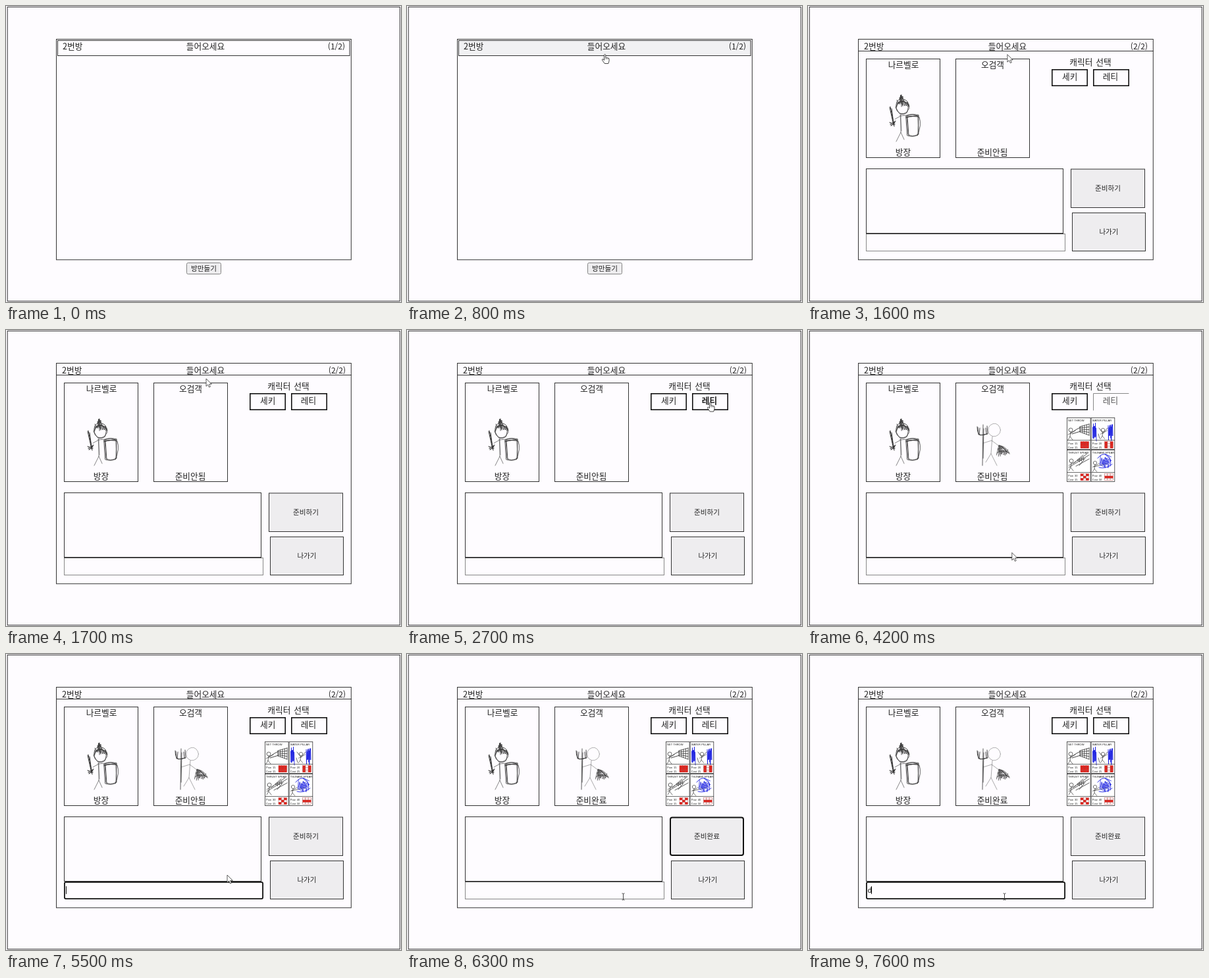
Write an HTML page that moves like this. It is 600 by 450 pixels and loops after 8 s.

```html
<!DOCTYPE html>
<html lang="ko">
<head>
<meta charset="utf-8">
<style>
html, body { margin: 0; width: 100%; height: 100%; overflow: hidden; background: #fefcff; }
svg { display: block; font-family: "Noto Sans CJK KR", "Noto Sans CJK", sans-serif; }
</style>
</head>
<body>
<svg id="stage" width="600" height="450" viewBox="0 0 600 450"></svg>
<script>
const stage = document.getElementById('stage');
const INK = '#222', LINE = '#333', PAPER = '#fefcff', GREY = '#eeedef';

let seed = 7;
const rnd = () => (seed = (seed * 16807) % 2147483647) / 2147483647 - 0.5;

// x, y, r, b are the outer edges; the border lies inside them
const box = (x, y, r, b, stroke = LINE, w = 1, fill = 'none', rx = 0) =>
  `<rect x="${x + w / 2}" y="${y + w / 2}" width="${r - x - w}" height="${b - y - w}" rx="${rx}" fill="${fill}" stroke="${stroke}" stroke-width="${w}"/>`;
// y is the vertical middle of the glyphs
const text = (s, x, y, size = 12.7, anchor = 'middle', extra = '') =>
  `<text x="${x}" y="${y + .4 + size * .37}" font-size="${size}" text-anchor="${anchor}" fill="${INK}" ${extra}>${s}</text>`;
const path = (d, w = .7, c = '#333') =>
  `<path d="${d}" fill="none" stroke="${c}" stroke-width="${w}" stroke-linecap="round" stroke-linejoin="round"/>`;

// Wobbly pen loops around an ellipse
function loops(cx, cy, rx, ry, n, jitter, w, c) {
  const pts = [];
  for (let i = 0; i <= n * 14; i++) {
    const a = i / 14 * Math.PI * 2;
    pts.push((cx + rx * Math.cos(a) + rnd() * jitter).toFixed(1) + ' ' + (cy + ry * Math.sin(a) + rnd() * jitter).toFixed(1));
  }
  return path('M' + pts.join('L'), w, c);
}
// Hatching back and forth across the line between two ends
function hatch(x0, y0, x1, y1, n, width, w, c) {
  const len = Math.hypot(x1 - x0, y1 - y0), nx = (y0 - y1) / len, ny = (x1 - x0) / len, pts = [];
  for (let i = 0; i <= n; i++) {
    const k = i / n, off = width * ((i % 2 ? .5 : -.5) + rnd() * .5);
    pts.push((x0 + (x1 - x0) * k + nx * off).toFixed(1) + ' ' + (y0 + (y1 - y0) * k + ny * off).toFixed(1));
  }
  return path('M' + pts.join('L'), w, c);
}
// Net between a left and a right edge
function net(xl, l0, l1, xr, r0, r1, n) {
  let d = '';
  for (let i = 0; i <= n; i++) {
    const k = i / n, x = xl + (xr - xl) * k;
    d += `M${xl} ${l0 + (l1 - l0) * k}L${xr} ${r0 + (r1 - r0) * k}M${x} ${l0 + (r0 - l0) * k}L${x + rnd()} ${l1 + (r1 - l1) * k}`;
  }
  return path(d, .7, '#222');
}

const knight =
  loops(143.5, 154.5, 9.5, 10, 3, 2.6, .6) +
  path('M134 154Q133 145 139 142L141 135L144 142Q152 142 154 153M136 149Q143 141 153 150M140 144L141 136L144 152M142 135L142 153', .9) +
  hatch(135, 147, 152, 148, 13, 6, .8) + hatch(139, 142, 145, 142, 5, 7, .8) +
  path('M141 165L141 192L134 206M141 192L146 203M132 172L141 167L150 166M140 165L142 190', .6) +
  path('M124 154L130 181M125 153L131 183M127 156L130 178', 1) +
  path('M125 180L133 175M124 177L132 180M126 182L132 177', 1.1) +
  path('M149 167Q158 163 168 166L167 196Q160 200 151 197ZM151 166Q161 163 167 168L168 195Q157 200 152 195L150 168M149 170Q160 166 169 169Q173 181 166 197M151 168L153 197M150 167L168 168M149 169L168 166', .8);

let fan = '';
for (let i = 0; i <= 7; i++) fan += `M${290 + i * .7} ${175 + i * .3}L${286.5 + i * 2.8} ${190 + 3 * Math.sin(i) - i * .5}`;
const fisher =
  loops(283, 152, 9.3, 9.8, 1, .5, .5, '#666') +
  path('M266 144L265 206M267 150L266 195', .8) +
  path('M257 147Q257 158 262 160L273 158L272 146M258 148L259 159Q266 161 272 158M261 149L260 159M270 149L271 158', .9) +
  path('M280 162L278 188L270 201M278 188L287 206M266 172L279 168L291 177', .5, '#555') +
  path(fan + 'M288 181Q295 176 301 182M287 187Q297 180 305 187M290 176Q299 175 306 187', .75) +
  hatch(289, 184, 303, 186, 14, 7, .6);

const BLUE = '#1d22e0', RED = '#e3241c';
const person = (x, y, s = 1) => `<g transform="translate(${x} ${y}) scale(${s})">` +
  path('M-3 0a3 3 0 1 0 6 0a3 3 0 1 0 -6 0M0 3L-1 10L-4 15M-1 10L3 15M-4 7L0 5L7 1') + '</g>';

function card(x, y, title, pow, cost, art, isRed) {
  const label = (s, dx, dy) => text(s, x + dx, y + dy, 4.1, 'start', 'font-family="Liberation Sans, sans-serif"');
  let grid = '';
  for (let i = 0; i < 9; i++) {
    const c = i % 3, r = Math.floor(i / 3);
    grid += `<rect x="${x + 21 + c * 4.2}" y="${y + 36.6 + r * 3.4}" width="4.2" height="3.4" fill="${isRed(c, r) ? RED : '#fff'}" stroke="#a33" stroke-width=".4"/>`;
  }
  return box(x, y, x + 36.5, y + 49, '#333', .8, '#fff') +
    label(title, 2, 4) + art + path(`M${x + 1} ${y + 34.5}h35`, .7) +
    label('Pow', 2, 38.7) + label(pow, 12, 38.7) + label('Cost', 2, 44.7) + label(cost, 12, 44.7) + grid;
}

const cards =
  card(393, 133, 'NET THROW', 15, 15,
    person(399, 152) + path('M399 157L408 151L414 148M401 158L414 154', .9) +
    net(413, 147, 155, 427, 143, 160, 4),
    () => true) +
  card(429.7, 133, 'WATER PILLAR', 20, 25,
    person(448, 152, .9) + path('M448 157L442 149M448 157L455 149M443 165L441 158') +
    hatch(432.5, 154, 438, 154, 11, 20, .9, BLUE) + hatch(456, 154, 463, 154, 13, 20, .9, BLUE),
    c => c !== 1) +
  card(393, 182, 'THRUST SPEAR', 30, 15,
    person(400, 199) + path('M396 209L427 190M403 203L418 190M407 207L427 196M409 199L424 188M412 206L421 195', .8) +
    hatch(410, 199, 419, 195, 6, 5, .8),
    (c, r) => (c + r) % 2 === 0) +
  card(429.7, 182, 'TSUNAMI SPEAR', 40, 50,
    person(436, 202, .9) + path('M434 208L455 203') +
    hatch(443, 200, 458, 202, 12, 12, .8, BLUE) + hatch(446, 207, 458, 191, 9, 10, .8, BLUE) +
    path('M440 195Q447 186 454 190Q462 195 459 207M442 209Q452 212 462 204', .9, BLUE),
    (c, r) => r === 1);

const cursors = {
  arrow: '<path d="M0 0V11.5L2.7 9L4.5 13L6.4 12.2L4.7 8.3H8.3Z" fill="#fff" stroke="#333" stroke-width=".8"/>',
  hand: '<path d="M-1 1.2Q0 -.6 1.2 1.2V5.4Q2.2 4.6 3 5.7Q4 5 4.8 6.2Q6.3 5.6 6.5 7.4V10.6L5.3 14.5H-.3L-4 9.2Q-4.4 7.4 -2.6 7.8L-1 9.4Z" fill="#fff" stroke="#333" stroke-width=".9"/><path d="M1.2 5.4V8M3 5.7V8M4.8 6.2V8" stroke="#333" stroke-width=".6"/>',
  beam: '<path d="M-2 -5H-.5L0 -4.5L.5 -5H2M0 -4.5V4.5M-2 5H-.5L0 4.5L.5 5H2" fill="none" stroke="#333" stroke-width=".9"/>'
};
// time, x, y
const track = [
  [200, 539, 390], [500, 400, 205], [800, 300.5, 73], [1400, 300.5, 73], [1700, 304, 74], [2300, 304, 74],
  [2700, 460.5, 109.5], [3600, 460.5, 109.5], [3800, 425, 190], [4200, 309.8, 338.5], [4400, 303, 359], [5400, 303, 359],
  [5700, 402, 290], [5900, 404, 291], [6000, 404, 291], [6300, 328.5, 369], [6400, 305, 376], [6500, 305, 376],
  [6700, 298.5, 369], [8000, 298.5, 369]
];

function pointer(t) {
  const i = track.findIndex(k => k[0] > t);
  if (i < 1) return null;
  const [t0, x0, y0] = track[i - 1], [t1, x1, y1] = track[i], k = (t - t0) / (t1 - t0);
  return { x: x0 + (x1 - x0) * k, y: y0 + (y1 - y0) * k };
}
const within = (p, x, y, r, b) => p && p.x >= x && p.x <= r && p.y >= y && p.y <= b;

function lobby(p) {
  const hover = within(p, 78, 52, 522, 75);
  return box(78, 52, 522.5, 76, LINE, 1, hover ? '#f1f1f3' : 'none') +
    text('2번방', 86, 61, 12.7, 'start') + text('들어오세요', 303, 61) + text('(1/2)', 515, 61.5, 12, 'end') +
    box(274, 390, 327, 408, '#858585', 1, GREY, 2) + text('방만들기', 300.5, 398.5, 10.6);
}

function room(t, p) {
  const chosen = t >= 3600, ready = t >= 5900;
  const typing = (t >= 4400 && t < 5900) || t >= 6700;
  const typed = t >= 7600;
  const caret = typing && (t < 5000 || (t >= 5500 && t < 7300) || typed);
  const pressed = chosen && t < 4400;
  const focused = ready && t < 6700;
  const label = within(p, 433, 96, 488, 122) ? 'font-weight="700"' : pressed ? 'opacity=".75"' : '';
  let s = path('M76.5 68.5H524.5', 1, LINE) +
    text('2번방', 85, 60.5, 12.7, 'start') + text('들어오세요', 303, 60.5) + text('(2/2)', 516, 61, 12, 'end') +
    box(88, 80, 201, 231) + box(224, 80, 337, 231) +
    text('나르벨로', 145, 89) + text('방장', 144.5, 222) + knight +
    text('오검객', 280.5, 89) + text(ready ? '준비완료' : '준비안됨', 280, 222) +
    text('캐릭터 선택', 429, 85, 12.7, 'middle', 'word-spacing="1.5"') +
    box(370, 96, 425, 122, '#111', 1.6) + text('세키', 397.7, 106.5) +
    (pressed ? path('M433.5 122V96.5H487', 1, '#888') : box(433, 96, 488, 122, '#111', 1.6)) +
    text('레티', 459.5, 106.5, 12.7, 'middle', label);
  if (chosen) s += fisher + cards;
  s += box(88, 247, 388, 346) +
    (typing ? box(88, 346, 391, 373, '#111', 1.8, PAPER, 2)
            : box(88, 346, 391, 373, '#888', 1, PAPER) + path('M88.5 346H387.5', 1, INK)) +
    box(399, 247.5, 512, 307, focused ? '#111' : LINE, focused ? 2 : 1, GREY, focused ? 3 : 0) +
    text(ready ? '준비완료' : '준비하기', 455.5, 277, 10.6) +
    box(401, 314, 513, 373, LINE, 1, GREY) + text('나가기', 457, 343, 10.6);
  if (typed) s += text('d', 90.5, 359, 10.6, 'start');
  if (caret) s += path(`M${typed ? 96.5 : 91.5} 353.5V364.5`, 1, '#111');
  return s;
}

function scene(t) {
  const p = pointer(t), inRoom = t >= 1500;
  let s = `<rect width="600" height="450" fill="${PAPER}"/>` + box(1.7, 1, 598.8, 449.2) + box(76, 50, 524.8, 386.3) +
    (inRoom ? room(t, p) : lobby(p));
  if (p) {
    const hand = inRoom ? within(p, 433, 96, 488, 122) : within(p, 78, 52, 522, 75);
    const beam = inRoom && within(p, 88, 346, 391, 373);
    s += `<g transform="translate(${p.x} ${p.y})">${cursors[hand ? 'hand' : beam ? 'beam' : 'arrow']}</g>`;
  }
  return s;
}

let last = -1;
const start = performance.now();
function tick() {
  // the screen updates ten times a second
  const t = Math.floor(((performance.now() - start) % 8000) / 100) * 100;
  if (t !== last) stage.innerHTML = scene(last = t);
  requestAnimationFrame(tick);
}
tick();
</script>
</body>
</html>
```
